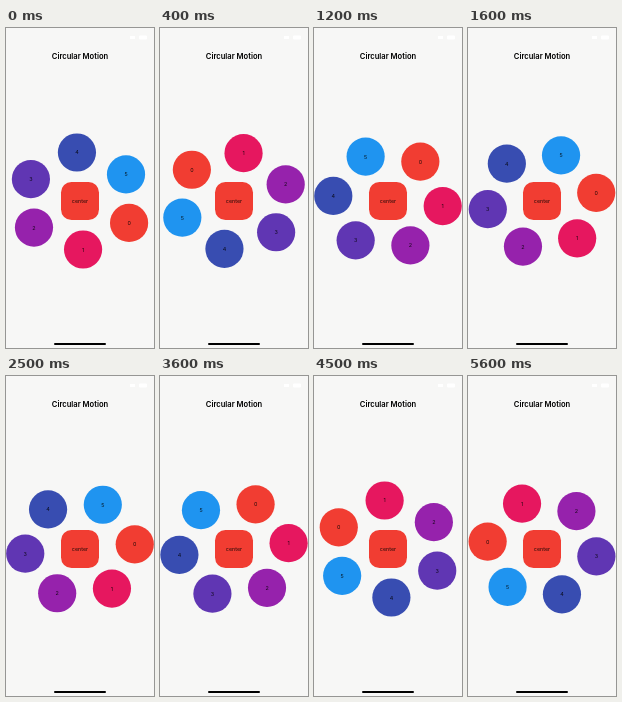
Animation of 148 by 320 pixels, one loop 5700 ms. Source, as an HTML page:

```html
<!DOCTYPE html>
<html lang="en">
<head>
<meta charset="utf-8">
<title>Circular Motion</title>
<style>
  html, body { margin: 0; width: 100%; height: 100%; overflow: hidden; background: #f7f7f6; }
  svg { display: block; width: 148px; height: 320px; }
  text { font: 5.4px Inter, sans-serif; text-anchor: middle; fill: #000; fill-opacity: .85; }
  .title { font-size: 7.6px; font-weight: 600; fill-opacity: 1; }
</style>
</head>
<body>
<svg viewBox="0 0 148 320">
  <g fill="#fff">
    <rect x="124" y="8" width="5" height="3"/>
    <rect x="133" y="7.5" width="8" height="4" rx="1"/>
  </g>
  <text class="title" x="74" y="31">Circular Motion</text>
  <rect x="55" y="154" width="38" height="38" rx="10.5" fill="#f13d32"/>
  <text x="74" y="175">center</text>
  <g id="balls"></g>
  <rect x="48" y="315" width="52" height="2" rx="1"/>
</svg>
<script>
const LOOP = 5700, STEP = 100;
const COLORS = ['#f13d32', '#e6175f', '#9622ac', '#6036b3', '#384db1', '#1f94f0'];

const balls = COLORS.map((color, i) => {
  const group = document.createElementNS('http://www.w3.org/2000/svg', 'g');
  group.innerHTML = `<circle r="19.1" fill="${color}"/><text y="2">${i}</text>`;
  return document.getElementById('balls').appendChild(group);
});

// Distance of a fling under drag k plus a constant braking force, s in seconds.
const fling = (s, speed, k, brake) =>
  speed / k * (1 - Math.exp(-k * s)) - brake * s * s / 2;

// Angle of ball 0 in degrees, clockwise from the right.
function angleAt(ms) {
  const t = ms / 1000;
  if (t < 0.4) return 26.8 + 193.2 * (t / 0.4) ** 2.4;
  if (t < 3.1) return 220 + fling(Math.min(t - 0.4, 1.4), 1158, 2, 50.3);
  if (t < 3.6) return 354.1 - 61 * ((t - 3.1) / 0.5) ** 1.6;
  return 293.1 - fling(t - 3.6, 197, 1.84, 0);
}

function draw(now) {
  const ms = Math.floor(now % LOOP / STEP) * STEP;
  const start = angleAt(ms);
  balls.forEach((ball, i) => {
    const a = (start + i * 60) * Math.PI / 180;
    const x = 74 + 55 * Math.cos(a), y = 173 + 48.6 * Math.sin(a);
    ball.setAttribute('transform', `translate(${x.toFixed(2)} ${y.toFixed(2)})`);
  });
}

let begin;
function tick(now) {
  begin ??= now;
  draw(now - begin);
  requestAnimationFrame(tick);
}
draw(0);
requestAnimationFrame(tick);
</script>
</body>
</html>
```
